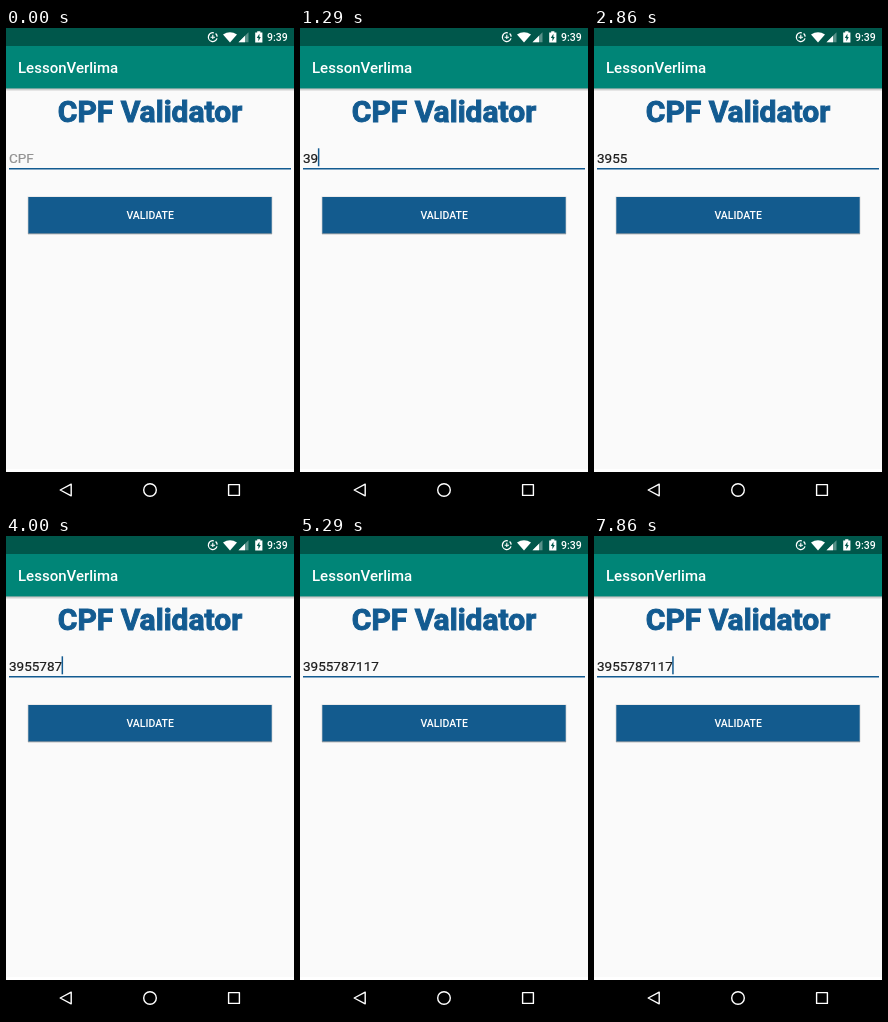
Write an HTML page that moves like this. It is 288 px wide and 480 px high and loops after 8000 ms.

```html
<!DOCTYPE html>
<html lang="en">
<head>
<meta charset="utf-8">
<title>CPF Validator</title>
<style>
  html, body { margin: 0; width: 100%; height: 100%; overflow: hidden; background: #fafafa; }
  svg { display: block; width: 288px; height: 480px; }
  text { font-family: Roboto, "Open Sans", sans-serif; }
</style>
</head>
<body>
<svg viewBox="0 0 288 480" xmlns="http://www.w3.org/2000/svg">
  <defs>
    <linearGradient id="shade" x1="0" y1="0" x2="0" y2="1">
      <stop offset="0" stop-color="#000" stop-opacity=".3"/>
      <stop offset="1" stop-color="#000" stop-opacity="0"/>
    </linearGradient>
  </defs>
  <rect width="288" height="480" fill="#fafafa"/>

  <!-- app bar -->
  <rect y="60" width="288" height="3.5" fill="url(#shade)"/>
  <rect y="18" width="288" height="42.4" fill="#008577"/>
  <rect width="288" height="18" fill="#00574b"/>
  <text x="12" y="45" font-size="15" font-weight="500" fill="#fff">LessonVerlima</text>

  <!-- status icons -->
  <g fill="#fff">
    <path d="M207.8 4.8A4.4 4.4 0 1 0 211 10.4M209.6 5.6A4.4 4.4 0 0 1 211.2 8.6" fill="none" stroke="#fff" stroke-width="1.3"/>
    <path d="M206.8 6.8V9.2H209M204.6 9.2H206.8V11" fill="none" stroke="#fff" stroke-width="1.1"/>
    <path d="M217 6.5Q224 1.8 231 6.5L224 14.4Z"/>
    <path d="M242.5 4.2V14.2H232.5Z" opacity=".35"/>
    <path d="M239 7.7V14.2H232.5Z"/>
    <path d="M249.2 4.4H251.2V3.2H254.4V4.4H256.4V14.6H249.2Z"/>
    <path d="M253.4 5.8L250.8 10H252.4V13.2L254.8 9H253.4Z" fill="#00574b"/>
    <text x="261" y="13.4" font-size="10.5" font-weight="500">9:39</text>
  </g>

  <!-- form -->
  <text x="144" y="93.7" text-anchor="middle" font-size="30" font-weight="700" fill="#135b91" stroke="#135b91" stroke-width="1">CPF Validator</text>
  <text id="field" x="3" y="134.6" font-size="13.5" stroke-width=".2"></text>
  <rect id="caret" y="120.3" width="1.5" height="18" fill="#135b91"/>
  <rect x="3" y="140" width="282" height="1.5" fill="#135b91"/>
  <rect x="21.5" y="168.5" width="245" height="37.5" fill="#000" opacity=".12"/>
  <rect x="22" y="205" width="244" height="2.5" fill="url(#shade)"/>
  <rect x="22.3" y="169" width="243.4" height="36.4" fill="#135b8e"/>
  <text x="144.2" y="191.4" text-anchor="middle" font-size="10.5" font-weight="500" fill="#fff">VALIDATE</text>

  <!-- navigation bar -->
  <rect y="441" width="288" height="3" fill="#fff"/>
  <rect y="444" width="288" height="36" fill="#000"/>
  <g fill="none" stroke="#fff" stroke-width="1.4" stroke-linejoin="round">
    <path d="M65.2 456.2V467.8L54.2 462Z"/>
    <circle cx="144" cy="462" r="6.3"/>
    <rect x="222.6" y="456.6" width="10.8" height="10.8"/>
  </g>
</svg>
<script>
  const LOOP = 8000;
  const digits = "3955787117";
  const keyTimes = [860, 1290, 1710, 2140, 3000, 3430, 3710, 4290, 4570, 4860];
  // the caret flips at each of these times, starting hidden
  const caretFlips = [140, 570, 860, 2710, 3000, 3710, 3860, 5290, 5860, 6290, 6860, 7290, 7860];
  const field = document.getElementById("field");
  const caret = document.getElementById("caret");
  const passed = (times, t) => times.filter(x => x <= t).length;

  function render(t) {
    const n = passed(keyTimes, t);
    const ink = n ? "#1c1c1c" : "#929292";
    field.textContent = n ? digits.slice(0, n) : "CPF";
    field.setAttribute("fill", ink);
    field.setAttribute("stroke", ink);
    caret.setAttribute("x", 2.8 + n * 7.54);
    caret.setAttribute("visibility", passed(caretFlips, t) % 2 ? "visible" : "hidden");
  }

  function tick() {
    render(performance.now() % LOOP);
    requestAnimationFrame(tick);
  }
  tick();
</script>
</body>
</html>
```
